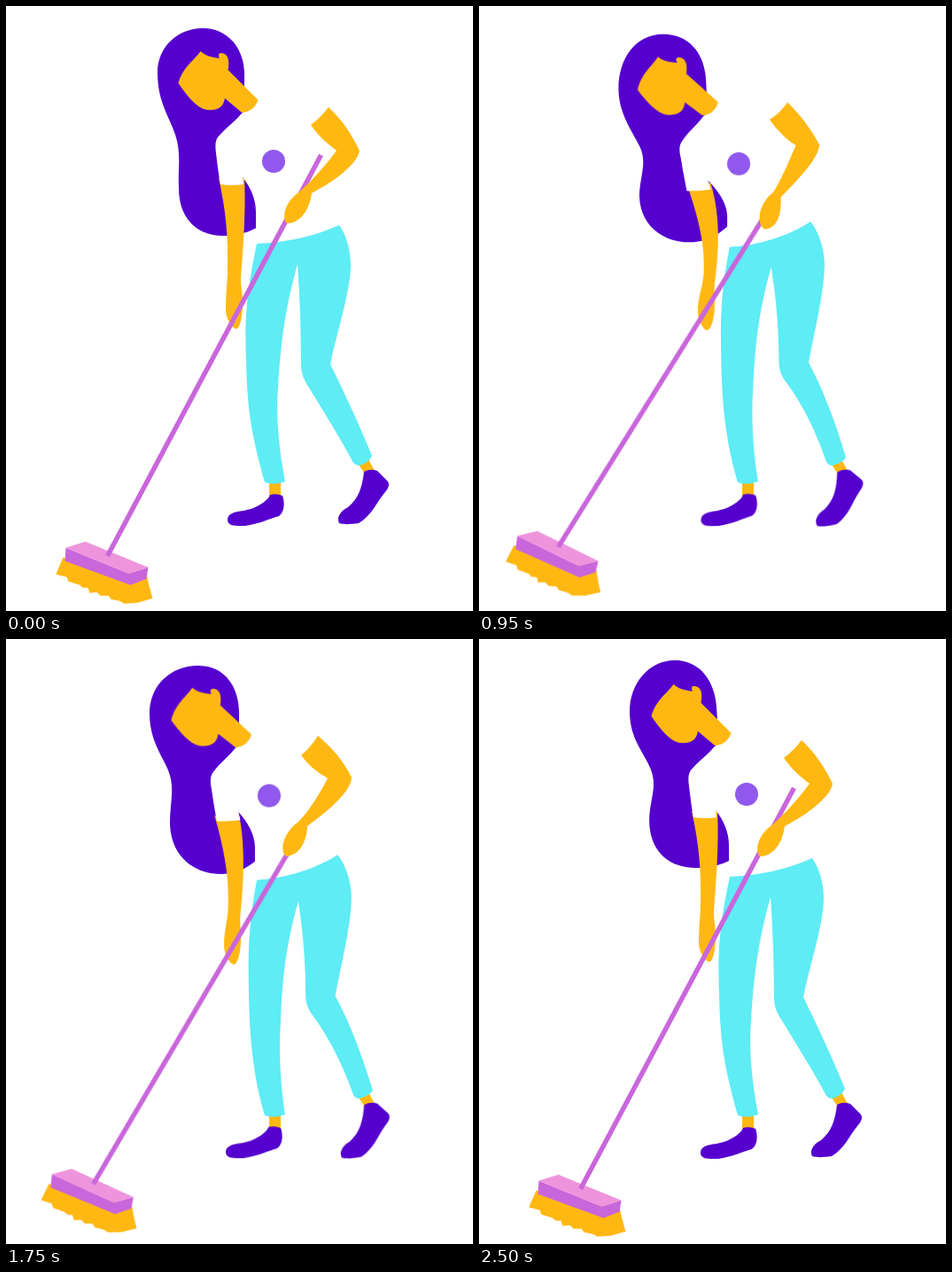
These frames come from a looping animation (527x682 px, 2.55 s). An HTML page without scripts:

```html
<!DOCTYPE html>
<html lang="en">
<head>
<meta charset="utf-8">
<title>Sweeping</title>
<style>
html, body { margin: 0; width: 100%; height: 100%; overflow: hidden; background: #fff; }
svg { display: block; width: 100%; height: 100%; }

.skin { fill: #ffb812; }
.violet { fill: #5500cf; }
.cloth { fill: #5eecf5; }
.shirt { fill: #fff; }

.move { animation: 2.55s linear infinite; }
.hair { animation-name: hair; }
.shirt { animation-name: shirt; }
.badge { animation-name: badge; fill: #9058ec; }
.head { animation-name: head; transform-origin: 266px 120px; }
.front-leg { animation-name: front-leg; }
.back-leg { animation-name: back-leg; }
.front-shoe { animation-name: front-shoe; transform-origin: 305px 552px; }
.back-shoe { animation-name: back-shoe; transform-origin: 412px 524px; }
.low-arm { animation-name: low-arm; }
.low-hand { animation-name: low-hand; }
.high-arm { animation-name: high-arm; }
.broom { animation-name: broom; transform-origin: 115px 619px; }

/* The torso leans forward, then straightens a little more slowly. */
@keyframes shirt {
  0%, 98%, 100% {
    d: path("M284 108L266 121C258 131 247 138 239 148C236 152 236 158 237 166C239 182 240 190 242 201Q255 203 268 201L267 193C276 204 282 218 282 232L282 252L283 270L376 248L350 120Z");
    animation-timing-function: cubic-bezier(.33, .42, .67, .9);
  }
  43.1% {
    d: path("M267 111L252 125C245 135 235 142 229 152C225 157 225 163 227 171C230 189 232 198 234 209Q248 209 261 207L258 197C270 209 279 222 280 236L280 248L283 275L374 244L335 120Z");
    animation-timing-function: cubic-bezier(.33, .37, .67, .67);
  }
}
@keyframes badge {
  0%, 98%, 100% { transform: none; animation-timing-function: cubic-bezier(.33, .42, .67, .9); }
  43.1% { transform: translate(-9.5px, 3px); }
}
@keyframes low-arm {
  0%, 98%, 100% {
    d: path("M240 194L269 194C271 235 267 280 265 308C265 318 267 322 267 335C267 350 264 364 260 364C254 363 248 352 248 342C248 325 250 310 250 298C251 260 248 230 240 194Z");
    animation-timing-function: cubic-bezier(.33, .42, .67, .9);
  }
  43.1% {
    d: path("M235 198L262 198C274 235 272 272 268 304C266 318 267 322 267 335C267 350 263 364 258 364C253 362 248 352 248 342C248 325 256 310 255 292C256 262 246 230 235 198Z");
  }
}
@keyframes low-hand {
  0%, 27.5%, 98%, 100% { transform: none; }
  45%, 68.6% { transform: translate(-2px, 3px); }
  86.3% { transform: translate(-1px, 1px); }
}
@keyframes head {
  0%, 98%, 100% { transform: none; }
  11.8% { transform: translate(-5.2px, 1px) rotate(-1.5deg); }
  27.5% { transform: translate(-12px, 2.5px) rotate(-3deg); }
  43.1% { transform: translate(-14.8px, 4px) rotate(-3.5deg); }
  49% { transform: translate(-13.7px, 3.8px) rotate(-3.2deg); }
  68.6% { transform: translate(-7px, 2.2px) rotate(-2deg); }
  86.3% { transform: translate(-2.8px, .9px) rotate(-.8deg); }
}
@keyframes hair {
  0%, 100% { d: path("M222 25C194 25 171 46 171 75C171 108 184 124 191 145C198 167 194 180 195 205C195 240 216 259 245 259C262 259 275 255 286 248L269 92L269 75C268 47 250 25 222 25Z"); }
  11.8% { d: path("M219 27C188 27 164 50 164 80C164 112 180 128 187 146C194 167 188 180 188 205C190 242 214 262 247 262C262 262 274 257 284 248L265 92L265 77C264 48 247 27 219 27Z"); }
  27.5% { d: path("M208 30C178 30 157 58 157 92C157 120 174 139 184 159C192 177 181 190 181 212C182 246 207 265 238 265C257 265 270 257 282 245L259 94L258 84C256 51 236 30 208 30Z"); }
  49% { d: path("M208 34C176 34 158 60 158 94C158 122 170 140 179 159C188 180 181 195 181 218C182 248 207 268 236 268C257 268 270 260 283 248L254 97L254 86C254 54 236 34 208 34Z"); }
  68.6% { d: path("M217 30C186 30 162 52 162 84C162 114 176 131 183 148C191 168 185 183 185 208C186 245 212 265 243 265C260 265 273 258 284 248L263 94L263 82C262 51 245 30 217 30Z"); }
  86.3% { d: path("M218 26C190 26 166 52 166 85C166 114 183 127 191 146C199 168 188 181 188 205C189 242 214 261 246 261C261 261 274 256 285 248L268 93L267 80C265 50 248 26 218 26Z"); }
  98% { d: path("M221 24C192 24 170 50 170 82C170 113 186 127 194 147C202 168 192 181 192 206C193 240 215 258 245 258C262 258 275 254 286 248L269 92L268 77C266 47 249 24 221 24Z"); }
}
@keyframes front-leg {
  0%, 86.3%, 100% { d: path("M283 268C272 320 269 350 271 400C272 460 279 490 292 537Q303 541 315 536C306 490 305 455 307 430C310 380 315 340 329 291L331 263Q305 268 283 268Z"); }
  27.5% { d: path("M282 271C272 320 269 350 271 400C272 460 279 490 292 537Q303 541 315 536C306 490 305 455 307 430C310 380 315 340 329 291L331 265Q305 270 282 271Z"); }
  40%, 68.6% { d: path("M283 272C274 320 273 350 274 400C275 460 281 500 292 537Q303 541 315 536C309 500 308 460 310 430C312 380 316 345 330 295L331 266Q305 271 283 272Z"); }
}
@keyframes back-leg {
  0%, 98%, 100% { d: path("M283 268C315 267 350 259 376 247C384 258 389 275 389 293C388 325 374 365 366 404C382 436 400 475 413 507Q410 514 402 517Q396 520 392 515C379 490 360 460 343 432C334 418 333 413 333 402C333 375 332 335 329 291Z"); }
  18%, 66.5% { d: path("M283 272C315 270 350 259 374 243C384 255 390 275 390 293C389 325 379 365 372 402C390 435 404 475 414 509Q410 515 402 517Q396 520 392 514C382 484 366 450 348 426C340 416 338.5 409 338.5 400C338.5 372 336 330 329 291Z"); }
}
@keyframes front-shoe {
  0%, 98%, 100% { transform: none; }
  11.8%, 27.5% { transform: translate(1px, 0) rotate(-1.5deg); }
  49% { transform: translate(-1px, -.8px); }
  68.6% { transform: translate(-2px, -.8px); }
  86.3% { transform: translate(-1px, -.4px); }
}
@keyframes back-shoe {
  0%, 98%, 100% { transform: none; }
  11.8% { transform: rotate(-3deg); }
  27.5%, 49% { transform: rotate(-5.5deg); }
  68.6% { transform: rotate(-3deg); }
  86.3% { transform: rotate(-1deg); }
}
@keyframes high-arm {
  0%, 98%, 100% { d: path("M364 114C380 129 390 145 399 163C397 178 370 198 345 211C342 232 331 245 317 245C311 240 314 222 329 211C336 206 357 185 373 163C361 154 352 146 344 134Q355 126 364 114Z"); }
  27.5% { d: path("M350 109C363 123 374 137 384 157C384 172 362 195 341 217C342 235 338 252 323 253C314 248 314 226 332 211C341 197 349 178 358 157C348 151 337 140 329 128Q341 121 350 109Z"); }
  49% { d: path("M346 108C360 121 373 136 384 155C384 170 360 195 340 214C341 233 336 249 322 250C312 245 314 222 332 209C342 194 348 177 357 157C346 150 335 140 327 128Q338 121 346 108Z"); }
  68.6% { d: path("M352 109C368 123 380 136 390 156C389 173 364 193 340 211C339 231 330 244 316 245C309 240 311 220 330 206C342 194 353 176 363 157C351 150 342 143 333 131Q344 122 352 109Z"); }
}
@keyframes broom {
  0%, 98%, 100% { transform: none; }
  11.8% { transform: translate(-6px, -4.5px) rotate(1.2deg); }
  27.5% { transform: translate(-18px, -9px) rotate(3.2deg); }
  43.1% { transform: translate(-29px, -11px) rotate(4.3deg); }
  49% { transform: translate(-26px, -9.5px) rotate(4.2deg); }
  68.6% { transform: translate(-16px, -5.5px) rotate(2.4deg); }
  86.3% { transform: translate(-6px, -2.5px) rotate(1deg); }
}
</style>
</head>
<body>
<svg viewBox="0 0 527 682">
  <path class="move hair violet"/>
  <g class="move low-hand"><path class="move low-arm skin"/></g>
  <path class="move shirt"/>
  <path class="move head skin" d="M219.5 51C212 62 200 68 194.5 87C203 99 214 115 227 117C238 118 245 115 247 104L266 120C275 120 282 114 284.5 106L250.5 72C253 60 250 53 242 53C239 54 240 57 241 59C232 58 225 56 219.5 51Z"/>
  <circle class="move badge" cx="302" cy="175" r="13"/>

  <path class="skin" d="M297 536H310L310 553H297ZM398 517L409 511L416 524L406 529Z"/>
  <path class="move front-shoe violet" d="M298 551C297 556 285 566 268 569C256 570 250 573 250 579C250 587 260 586 270 586C285 584 297 578 308 575C314 571 315 560 312 552Q305 549 298 551Z"/>
  <path class="move back-shoe violet" d="M404 525C402 542 398 555 386 565C376 570 373 578 376 583C382 585 390 584 398 583C412 575 418 560 427 549C433 542 433 538 430 535L419 524Q411 521 404 525Z"/>
  <path class="move back-leg cloth"/>
  <path class="move front-leg cloth"/>

  <g class="move broom">
    <g transform="translate(.5 .8)">
      <path class="skin" d="M64 621C61 628 58 634 56 640L68 643L70 648L83 652L86 655L92 655L94 661L102 660L106 664L115 664L118 668L128 670L133 673L148 672L165 667C163 660 160 650 159 643Z"/>
      <path fill="#c966db" d="M67 610L138 639L160 632L158 645L140 652L66 625Z"/>
      <path fill="#ee94dc" d="M67 610L89 603L160 632L138 639Z"/>
    </g>
    <path fill="none" stroke="#c966db" stroke-width="5.5" d="M114.5 620L355.5 168"/>
  </g>
  <path class="move high-arm skin"/>
</svg>
</body>
</html>
```
